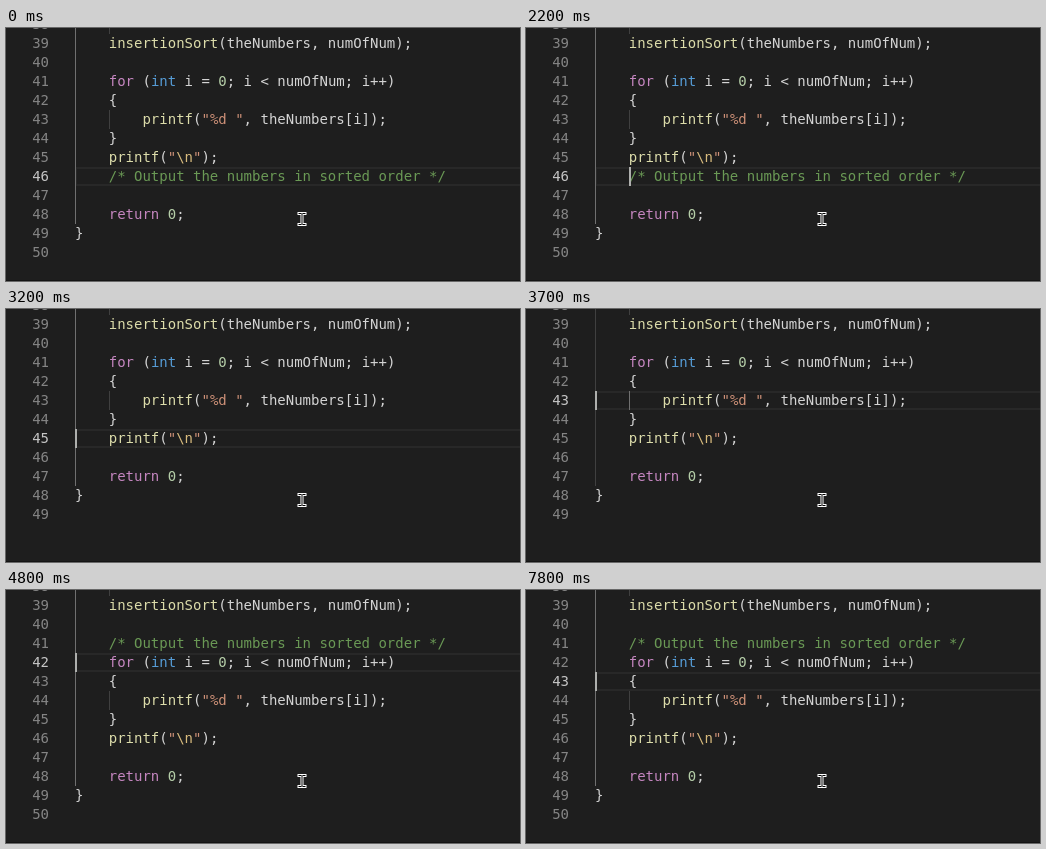
These frames come from a looping animation (514 by 253 pixels, 8000 ms). An HTML page:

```html
<!DOCTYPE html>
<html lang="en">
<head>
<meta charset="utf-8">
<title>Moving a line of code</title>
<style>
html, body { margin: 0; width: 100%; height: 100%; overflow: hidden; background: #1e1e1e; }
#stage {
  position: relative; width: 514px; height: 253px; overflow: hidden;
  font: 14px/19px "DejaVu Sans Mono", monospace; color: #d4d4d4;
}
#stage * { position: absolute; box-sizing: border-box; }
#stage .line, #stage .num { white-space: pre; height: 19px; }
#stage .line { left: 69px; }
#stage .line span { position: static; }
.num { left: 0; width: 43px; text-align: right; color: #858585; }
.num.on { color: #c6c6c6; }
.guide { width: 1px; background: #404040; }
.guide.on { background: #707070; }
#row { left: 69px; width: 447px; height: 19px; border: 2px solid #282828; }
#caret { width: 2px; height: 19px; background: #aeafad; }
#edge { left: 0; top: 252px; width: 514px; height: 1px; background: #141414; }
#mouse { left: 290px; top: 182px; }
.k { color: #c586c0; } .t { color: #569cd6; } .f { color: #dcdcaa; }
.n { color: #b5cea8; } .s { color: #ce9178; } .e { color: #d7ba7d; }
.c { color: #6a9955; }
</style>
</head>
<body>
<div id="stage">
  <div id="row"></div>
  <div id="view"></div>
  <div id="caret"></div>
  <div id="edge"></div>
  <svg id="mouse" width="12" height="19" viewBox="0 0 12 19" fill="none">
    <path id="beam" d="M3 3.5H5M7 3.5H9M6 4V14M3 14.5H5M7 14.5H9" stroke="#fff" stroke-width="3" stroke-linecap="square"/>
    <path d="M3 3.5H5M7 3.5H9M6 4V14M3 14.5H5M7 14.5H9" stroke="#000" stroke-linecap="square"/>
  </svg>
</div>
<script>
const FIRST = 38, TOP = -13, LH = 19, LEFT = 69, INDENT = 34, LOOP = 8000;
const $ = id => document.getElementById(id);
const y = line => TOP + (line - FIRST) * LH;
const tag = (cls, text) => `<span class="${cls}">${text}</span>`;
const pad = "    ";

const comment = pad + tag("c", "/* Output the numbers in sorted order */");
const head = ["", pad + tag("f", "insertionSort") + "(theNumbers, numOfNum);", ""];
const loop = [
  pad + tag("k", "for") + " (" + tag("t", "int") + " i = " + tag("n", "0") + "; i &lt; numOfNum; i++)",
  pad + "{",
  pad + pad + tag("f", "printf") + "(" + tag("s", '"%d "') + ", theNumbers[i]);",
  pad + "}",
  pad + tag("f", "printf") + "(" + tag("s", '"') + tag("e", "\\n") + tag("s", '"') + ");"
];
const tail = ["", pad + tag("k", "return") + " " + tag("n", "0") + ";", "}", ""];
const docs = {
  before: [...head, ...loop, comment, ...tail],
  cut: [...head, ...loop, ...tail],
  after: [...head, comment, ...loop, ...tail]
};

// start ms, document, active line, caret column, caret visible
const steps = [
  [0, "before", 46, 4, 0], [200, "before", 46, 4, 1], [700, "before", 46, 4, 0],
  [1200, "before", 46, 4, 1], [1700, "before", 46, 4, 0], [2200, "before", 46, 4, 1],
  [2600, "cut", 46, 0, 1], [3000, "cut", 46, 0, 0], [3200, "cut", 45, 0, 1],
  [3500, "cut", 44, 0, 1], [3700, "cut", 43, 0, 1], [3800, "cut", 42, 0, 1],
  [4000, "cut", 41, 0, 1], [4500, "cut", 41, 0, 0],
  [4800, "after", 42, 0, 1], [5300, "after", 42, 0, 0], [5800, "after", 42, 0, 1],
  [6300, "after", 42, 0, 0], [6800, "after", 43, 0, 1], [7300, "after", 43, 0, 0],
  [7800, "after", 43, 0, 1]
];

function guide(level, from, to, on) {
  return `<div class="guide${on ? " on" : ""}" style="left:${LEFT + level * INDENT}px;top:${y(from)}px;height:${(to - from) * LH}px"></div>`;
}

function show([, name, active, col, visible]) {
  const lines = docs[name];
  const inner = FIRST + lines.findIndex(s => s.startsWith(pad + pad));
  const end = FIRST + lines.length - 2;
  const inside = active === inner;
  $("view").innerHTML =
    guide(0, FIRST, end, !inside) + guide(1, FIRST, FIRST + 1) + guide(1, inner, inner + 1, inside) +
    lines.map((text, i) => {
      const n = FIRST + i, top = `style="top:${y(n)}px"`;
      return `<div class="num${n === active ? " on" : ""}" ${top}>${n}</div><div class="line" ${top}>${text}</div>`;
    }).join("");
  $("row").style.top = $("caret").style.top = y(active) + "px";
  $("caret").style.left = LEFT + (col ? INDENT : 0) + "px";
  $("caret").style.visibility = visible ? "visible" : "hidden";
}

let current;
function tick() {
  const t = performance.now() % LOOP;
  const step = steps.findLast(s => s[0] <= t);
  if (step !== current) show(current = step);
  requestAnimationFrame(tick);
}
tick();
</script>
</body>
</html>
```
